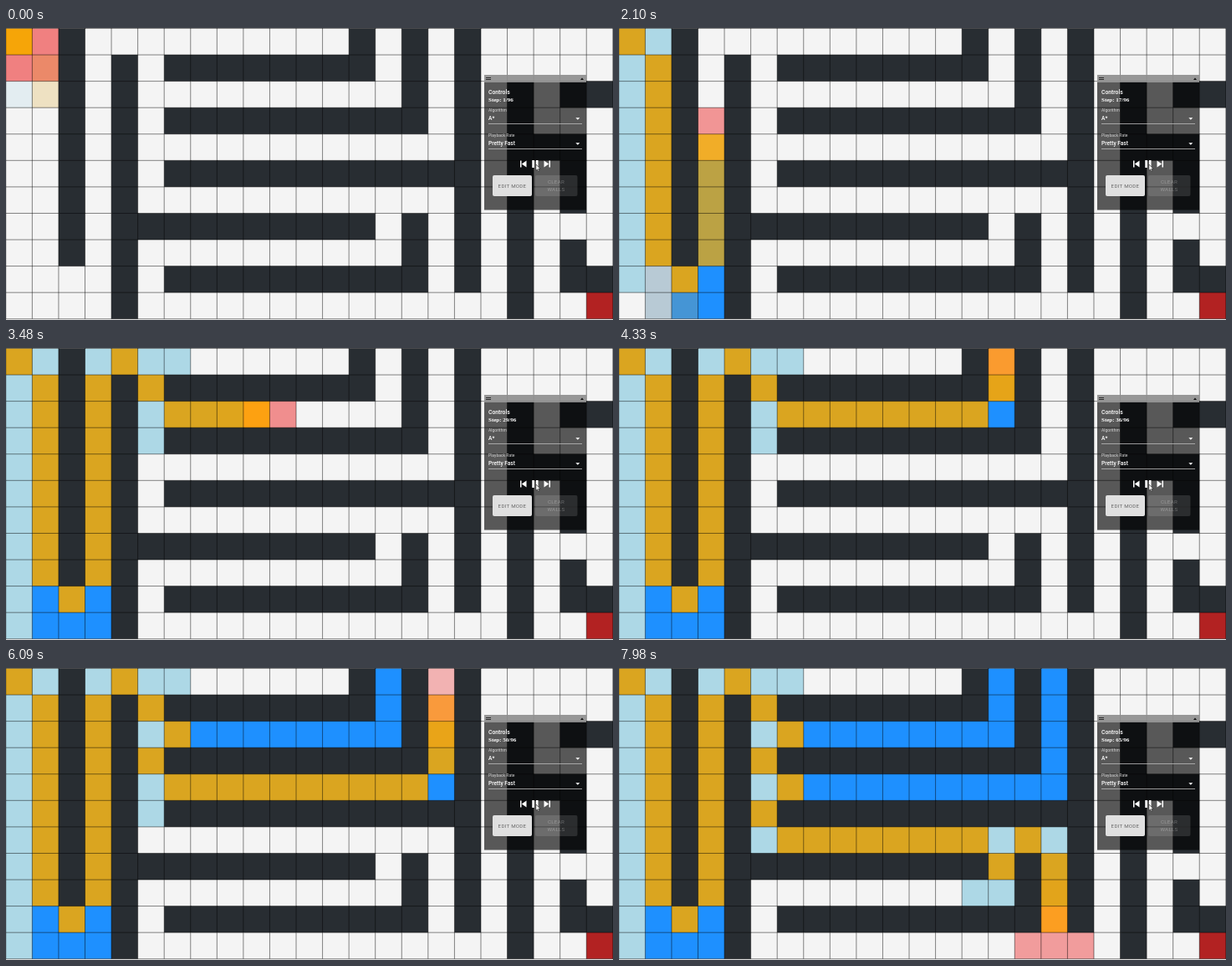
Write an HTML page with a canvas that moves like this. It is 726 px wide and 349 px high and loops after 8 s.

```html
<!DOCTYPE html>
<html lang="en">
<head>
<meta charset="utf-8">
<title>Pathfinding grid</title>
<style>
  html, body { margin: 0; width: 100%; height: 100%; overflow: hidden; background: #f4f4f4; }
  canvas, svg { position: absolute; left: 0; top: 0; display: block; }
  text { font-family: Roboto, Arial, sans-serif; fill: #fff; }
  .title { font-size: 6.8px; font-weight: 500; }
  .step { font: bold 7px "Liberation Serif", "Times New Roman", serif; }
  .label { font-size: 5px; fill: #d2d2d2; }
  .value { font-size: 6.6px; font-weight: 500; }
  .button { font-size: 6.2px; letter-spacing: .25px; text-anchor: middle; }
</style>
</head>
<body>
<canvas id="grid" width="726" height="349"></canvas>
<svg width="726" height="349" viewBox="0 0 726 349">
  <rect x="572" y="56" width="122" height="161.5" fill="#000" fill-opacity=".64"/>
  <rect x="572" y="56" width="122" height="9" fill="#aaa" fill-opacity=".78"/>
  <path d="M574 59.5h6M574 61.5h6" stroke="#222" stroke-width=".9"/>
  <path d="M687 62l2-2.4 2 2.4z" fill="#111"/>

  <text class="title" x="577" y="79">Controls</text>
  <text class="step" x="577" y="88" id="step">Step: 1/96</text>
  <text class="label" x="577" y="99.5">Algorithm</text>
  <text class="value" x="577" y="110">A*</text>
  <text class="label" x="577" y="129.5">Playback Rate</text>
  <text class="value" x="577" y="140">Pretty Fast</text>
  <path d="M577 114.5h112M577 144.5h112" stroke="#bbb" stroke-width=".8"/>
  <path d="M681.3 107.2h5l-2.5 2.5zM681.3 137.2h5l-2.5 2.5z" fill="#fff"/>

  <g fill="#fff">
    <path d="M615 158.5h1.5v8h-1.5zM622.5 158.5v8l-5.7-4z"/>
    <path d="M629.3 158h2.5v9h-2.5zM634 158h2.5v9h-2.5z"/>
    <path d="M643.5 158.5v8l5.7-4zM649.5 158.5h1.5v8h-1.5z"/>
  </g>

  <rect x="582" y="176" width="47" height="25" rx="2" fill="#e0e0e0"/>
  <text class="button" x="605.5" y="190.5" style="fill:#666">EDIT MODE</text>
  <rect x="633" y="176" width="50.5" height="25" rx="2" fill="#fff" fill-opacity=".12"/>
  <g fill-opacity=".3">
    <text class="button" x="658" y="186">CLEAR</text>
    <text class="button" x="658" y="195.4">WALLS</text>
  </g>
  <path d="M633.8 163v7.4l1.7-1.5 1.2 2.5 1.2-.6-1.2-2.4h2.4z" fill="#fff" stroke="#111" stroke-width=".6"/>
</svg>
<script>
const MAP = [
  "..#..........#.#.#.....",
  "..#.#.########.#.#.....",
  "..#.#..........#.#.#.##",
  "..#.#.##########.#.#...",
  "..#.#............#.###.",
  "..#.#.############.#.#.",
  "..#.#............#.#.#.",
  "..#.##########.#.#.#...",
  "..#.#..........#.#.#.#.",
  "....#.##########.#.#.##",
  "....#..............#..."
];
const COLS = 23, ROWS = 11, SIZE = 726 / COLS, LEFT = -.2, TOP = .5;
const LOOP = 8000, FADE = 200, VISITS = 67;
const FLOOR = [244, 244, 244], WALL = [40, 45, 50], GOAL = [178, 34, 34];
const CURRENT = [255, 165, 0], PATH = [218, 165, 32], CLOSED = [30, 144, 255];
const FRESH = [240, 128, 128], OPEN = [173, 216, 230];
// [visit, ms at which it begins]; visits in between are evenly spaced
const PACE = [[0, -84], [8, 908], [17, 2004], [23, 2732], [35, 4264], [50, 6036], [65, 7896], [66, 8020]];

const id = (x, y) => y * COLS + x;
const goal = id(COLS - 1, ROWS - 1);
const isWall = (x, y) => MAP[y][x] === "#";
const edgeX = k => LEFT + k * SIZE;
const edgeY = k => TOP + k * SIZE;

function startOf(visit) {
  const i = Math.max(1, PACE.findIndex(p => p[0] >= visit));
  const [v0, t0] = PACE[i - 1], [v1, t1] = PACE[i];
  return t0 + (t1 - t0) * (visit - v0) / (v1 - v0);
}

function neighbours(cell) {
  const cx = cell % COLS, cy = Math.floor(cell / COLS), found = [];
  for (let y = Math.max(0, cy - 1); y <= Math.min(ROWS - 1, cy + 1); y++)
    for (let x = Math.max(0, cx - 1); x <= Math.min(COLS - 1, cx + 1); x++)
      if (id(x, y) !== cell && !isWall(x, y))
        found.push({ cell: id(x, y), cost: Math.hypot(x - cx, y - cy) });
  return found;
}

function mix(from, to, elapsed) {
  const x = Math.min(1, Math.max(0, elapsed / FADE));
  const p = 1 - (1 - x) ** 2.6;
  return from.map((c, i) => c + (to[i] - c) * p);
}

function colourAt(fades, t) {
  let i = fades.length - 1;
  while (i > 0 && fades[i].at > t) i--;
  return mix(fades[i].from, fades[i].to, t - fades[i].at);
}

const rest = colour => [{ at: -1e4, from: colour, to: colour }];
const fades = Array.from({ length: COLS * ROWS }, (_, c) =>
  rest(c === goal ? GOAL : isWall(c % COLS, Math.floor(c / COLS)) ? WALL : FLOOR));

// Colours left over from the run before
fades[id(0, 0)] = rest(PATH);
fades[id(1, 0)] = rest(FRESH);
fades[id(0, 1)] = rest(FRESH);
fades[id(1, 1)] = rest(PATH);
fades[id(0, 2)] = rest(OPEN);
fades[id(1, 2)] = rest(PATH);

// A* weighted by the squared distance to the goal
function search() {
  const cost = new Map([[0, 0]]), parent = new Map(), open = new Set([0]), closed = new Set();
  const score = c => cost.get(c) + (COLS - 1 - c % COLS) ** 2 + (ROWS - 1 - Math.floor(c / COLS)) ** 2;

  for (let visit = 0; visit < VISITS && open.size; visit++) {
    const current = [...open].reduce((a, b) => score(b) < score(a) ? b : a);
    open.delete(current);
    closed.add(current);
    const fresh = new Set();
    for (const n of neighbours(current)) {
      if (closed.has(n.cell)) continue;
      fresh.add(n.cell);
      open.add(n.cell);
      const total = cost.get(current) + n.cost;
      if (total < (cost.get(n.cell) ?? Infinity)) {
        cost.set(n.cell, total);
        parent.set(n.cell, current);
      }
    }
    const path = new Set();
    for (let c = current; c !== undefined; c = parent.get(c)) path.add(c);

    const at = startOf(visit);
    fades.forEach((list, c) => {
      if (c === goal || isWall(c % COLS, Math.floor(c / COLS))) return;
      const to = c === current ? CURRENT : path.has(c) ? PATH : closed.has(c) ? CLOSED
        : fresh.has(c) ? FRESH : open.has(c) ? OPEN : FLOOR;
      if (list[list.length - 1].to !== to) list.push({ at, from: colourAt(list, at), to });
    });
  }
}
search();

const ctx = document.getElementById("grid").getContext("2d");
const stepText = document.getElementById("step");

function draw(t) {
  ctx.fillStyle = "#f4f4f4";
  ctx.fillRect(0, 0, 726, 349);
  // Each cell reaches under the next one, so soft edges leave no seams
  fades.forEach((list, c) => {
    ctx.fillStyle = `rgb(${colourAt(list, t).map(Math.round)})`;
    ctx.fillRect(edgeX(c % COLS), edgeY(Math.floor(c / COLS)), SIZE + 1, SIZE + 1);
  });
  ctx.fillStyle = "#f4f4f4";
  ctx.fillRect(0, edgeY(ROWS), 726, 2);

  ctx.strokeStyle = "rgba(0,0,0,.6)";
  ctx.lineWidth = .8;
  ctx.beginPath();
  for (let k = 0; k <= COLS; k++) {
    ctx.moveTo(edgeX(k), 0);
    ctx.lineTo(edgeX(k), edgeY(ROWS));
  }
  for (let k = 0; k <= ROWS; k++) {
    ctx.moveTo(0, edgeY(k));
    ctx.lineTo(726, edgeY(k));
  }
  ctx.stroke();
  const step = 1 + Math.max(0, Math.floor((t - 20) / 123));
  stepText.textContent = `Step: ${step}/96`;
}

const begin = performance.now();
function tick() {
  draw((performance.now() - begin) % LOOP);
  requestAnimationFrame(tick);
}
tick();
</script>
</body>
</html>
```
